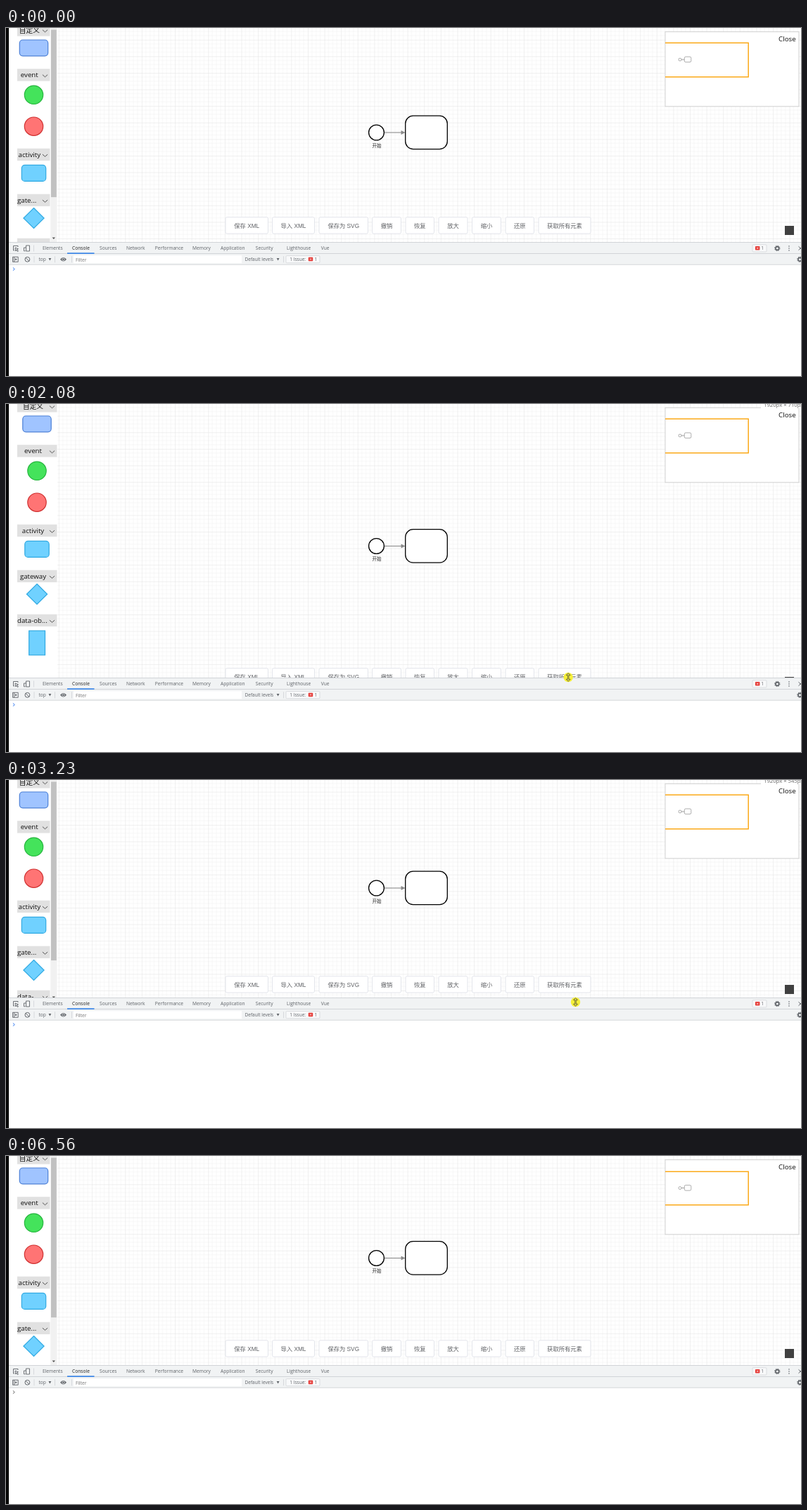
Write an HTML page that moves like this. It is 1130 px wide and 496 px high and loops after 6880 ms.

```html
<!DOCTYPE html>
<html lang="en">
<head>
<meta charset="utf-8">
<title>Resizing the panel</title>
<style>
  html, body { margin: 0; width: 100%; height: 100%; overflow: hidden; background: #fff; }
  svg { display: block; width: 1130px; height: 496px; }
  text { font-family: "Open Sans", "Noto Sans CJK SC", "Noto Sans CJK", sans-serif; white-space: pre; }
  .cjk { font-family: "Liberation Sans", "Noto Sans CJK SC", "Noto Sans CJK", sans-serif; }
</style>
</head>
<body>
<svg id="stage" viewBox="0 0 1130 496" xmlns="http://www.w3.org/2000/svg">
  <defs>
    <pattern id="grid" x="4" y="-6.9" width="23.61" height="23.61" patternUnits="userSpaceOnUse">
      <path d="M0 5.9H23.61M0 11.8H23.61M0 17.7H23.61M5.9 0V23.61M11.8 0V23.61M17.7 0V23.61"
        fill="none" stroke="#e0e0e0" stroke-width=".6" opacity=".45"/>
      <path d="M0 .3H23.61M.3 0V23.61" fill="none" stroke="#e0e0e0" stroke-width=".6"/>
    </pattern>
    <clipPath id="pageClip"><rect id="pageRect" width="1130" height="305"/></clipPath>
  </defs>
</svg>
<script>
const LOOP = 6880;
const stage = document.getElementById('stage');

function add(parent, tag, attrs = {}, content) {
  const el = document.createElementNS('http://www.w3.org/2000/svg', tag);
  for (const k in attrs) el.setAttribute(k, attrs[k]);
  if (content !== undefined) el.textContent = content;
  parent.append(el);
  return el;
}
const group = (parent, attrs) => add(parent, 'g', attrs);
const rect = (p, x, y, width, height, fill, more) => add(p, 'rect', { x, y, width, height, fill, ...more });
const path = (p, d, stroke, w = 1, fill = 'none') => add(p, 'path', { d, stroke, 'stroke-width': w, fill });
const circle = (p, cx, cy, r, fill, stroke = 'none', w = 1) =>
  add(p, 'circle', { cx, cy, r, fill, stroke, 'stroke-width': w });
// y is the middle of the line
const label = (p, x, y, str, size, fill, more) =>
  add(p, 'text', { x, y: y + size * .36, 'font-size': size, fill, ...more }, str);
const mid = { 'text-anchor': 'middle' };
const move = (el, x, y) => el.setAttribute('transform', `translate(${x} ${y})`);
const show = (el, on) => el.setAttribute('display', on ? 'inline' : 'none');

// ---- page ----
const page = group(stage, { 'clip-path': 'url(#pageClip)' });
rect(page, 73, 0, 1057, 496, 'url(#grid)');

const diagram = group(page);
path(diagram, 'M538 0H563', '#8a8a8a', 1.1);
path(diagram, 'M561.5 -3L567.5 0L561.5 3Z', 'none', 0, '#8a8a8a');
circle(diagram, 526.5, 0, 10.9, '#fff', '#000', 1.3);
rect(diagram, 567.7, -23.8, 59.6, 47.4, '#fff', { rx: 11, stroke: '#000', 'stroke-width': 1.3 });
label(diagram, 527, 18.3, '开始', 6.6, '#222', { ...mid, class: 'cjk' });

const buttons = group(page);
[[312, 372.5, '保存 XML'], [378.5, 438.5, '导入 XML'], [445, 514.5, '保存为 SVG'],
 [520.5, 561.5, '撤销'], [568, 608.5, '恢复'], [615, 656, '放大'], [662.5, 703.5, '缩小'],
 [710, 750.5, '还原'], [757, 831, '获取所有元素']].forEach(([a, b, str]) => {
  rect(buttons, a, -11.8, b - a, 23.4, '#fff', { rx: 2, stroke: '#dcdfe6', 'stroke-width': .8 });
  label(buttons, (a + b) / 2, 0, str, 8.3, '#606266', { ...mid, class: 'cjk' });
});
const mark = rect(page, 1107, 0, 13, 13, '#404040');

// ---- palette, in a narrow and a wide layout ----
function palette(wide) {
  const g = group(page);
  const c = wide ? 44 : 39.5, right = wide ? 72.5 : 62.5;
  rect(g, 4, 0, 69, 496, '#fff');
  const shape = { stroke: '#2fa9e2', 'stroke-width': 1.2 };
  [[3, '自定义'], [67, 'event'], [180.5, 'activity'],
   [245.5, wide ? 'gateway' : 'gate...'], [308.5, wide ? 'data-ob...' : 'data-...']].forEach(([y, str], i) => {
    rect(g, 16, y - 8.8, right - 16, 17.4, '#e1e1e1');
    const tight = i > 3 || (i == 3 && !wide);
    label(g, tight ? 16 : c - (wide ? 5.5 : 6.2), y, str, 9.7, '#111', tight ? {} : mid);
    const x = right - 7;
    path(g, `M${x - 3.6} ${y - .4}L${x} ${y + 2.8}L${x + 3.6} ${y - .4}`, '#444', .9);
  });
  rect(g, c - 20.2, 17, 40.4, 22.8, '#a0c4ff', { rx: 4.5, stroke: '#4a7fd6', 'stroke-width': 1.2 });
  circle(g, c, 95.3, 13.2, '#44e35b', '#27b53f', 1.2);
  circle(g, c, 140.2, 13.2, '#ff7474', '#cf3030', 1.2);
  rect(g, c - 17.2, 195.4, 34.4, 23, '#70d1ff', { rx: 4.5, ...shape });
  path(g, `M${c} 256.5L${c + 14.6} 271L${c} 285.5L${c - 14.6} 271Z`, shape.stroke, 1.2, '#70d1ff');
  rect(g, c - 11.3, 323.2, 22.8, 34.6, '#70d1ff', shape);
  return g;
}
const wide = palette(true), narrow = palette(false);
rect(narrow, 63.3, 0, 9.2, 496, '#f1f1f1');
const thumb = rect(narrow, 64, 2.5, 7.8, 238, '#c1c1c1');
const scrollArrow = path(narrow, 'M-2.2 -1.2H2.2L0 1.4Z', 'none', 0, '#505050');

// ---- minimap ----
rect(page, 937, 5.3, 190, 106.5, '#fff', { stroke: '#ccc', 'stroke-width': .9 });
const view = path(page, '', '#fba919', 1.5);
const tiny = group(page);
circle(tiny, 958, 0, 2, '#fff', '#777', .6);
path(tiny, 'M960 0H964', '#777', .7);
rect(tiny, 964.3, -4, 9.5, 7.6, '#fff', { rx: 1.8, stroke: '#777', 'stroke-width': .6 });
label(page, 1098, 15.2, 'Close', 9.8, '#111');
const sizeTip = group(page);
rect(sizeTip, 1073, 0, 57, 6, '#fff');
const sizeText = label(sizeTip, 1077, .8, '', 7.7, '#666');

// ---- developer tools ----
const tools = group(stage);
const ink = '#5f6368';
rect(tools, 4, -9, 1126, 520, '#fff');
rect(tools, 4, -9, 1126, 32, '#f1f3f4');
for (const y of [-9, 7.2, 22.8]) rect(tools, 4, y, 1126, .8, '#cacdd1');
path(tools, 'M12 3H10.5V-3.5H17V-2M13 -1L17.5 .8L15.4 1.6L17.5 4L16.5 4.6L14.8 2.4L13.6 4Z', ink, .9);
path(tools, 'M27.5 3.8H25.5V-1H28.5M28.5 -4H33.5V4H28.5Z', ink, .9);
path(tools, 'M39.5 -4.5V4.5', '#cacdd1', .7);
[[52, 'Elements'], [94, 'Console'], [133, 'Sources'], [171, 'Network'], [211.8, 'Performance'],
 [265, 'Memory'], [305, 'Application'], [354.8, 'Security'], [399, 'Lighthouse'], [447.8, 'Vue']]
  .forEach(([x, str]) => label(tools, x, 0, str, 6.65, str == 'Console' ? '#222' : ink));
rect(tools, 87, 6.4, 38.5, 1.4, '#1a73e8');

function gear(x, y) {
  circle(tools, x, y, 2.4, 'none', ink, 1.6);
  add(tools, 'circle', { cx: x, cy: y, r: 3.7, fill: 'none', stroke: ink, 'stroke-width': 1, 'stroke-dasharray': '1.5 1.4' });
}
function badge(x, y) {
  rect(tools, x, y - 3, 6.4, 5.4, '#e53935', { rx: .7 });
  path(tools, `M${x + 2} ${y - 1.5}L${x + 4.4} ${y + .9}M${x + 4.4} ${y - 1.5}L${x + 2} ${y + .9}`, '#fff', .7);
}
const chip = (x, y, w) => rect(tools, x, y - 5.2, w, 10.2, '#f8f9fa', { rx: 1.2, stroke: '#cfd2d6', 'stroke-width': .7 });
chip(1061, 0, 20);
badge(1065, 0);
label(tools, 1073.3, 0, '1', 6.6, ink);
gear(1096.3, 0);
for (const y of [-3, 0, 3]) circle(tools, 1113, y, .8, ink);
path(tools, 'M1126.5 -2.7L1132 2.7M1126.5 2.7L1132 -2.7', ink, 1);

const row = 15.8;
path(tools, `M9.5 ${row - 3.5}H17.2V${row + 3.5}H9.5ZM11.5 ${row - 3.5}V${row + 3.5}`, ink, .9);
path(tools, `M13 ${row - 1.8}L15.8 ${row}L13 ${row + 1.8}Z`, 'none', 0, ink);
circle(tools, 30.4, row, 3.4, 'none', ink, 1);
path(tools, `M28 ${row - 2.4}L32.8 ${row + 2.4}`, ink, 1);
label(tools, 46.4, row, 'top', 6.6, ink);
for (const x of [62.4, 386.6]) path(tools, `M${x - 1.9} ${row - 1.7}H${x + 1.9}L${x} ${row + 1.7}Z`, 'none', 0, ink);
for (const x of [40, 69.5, 93.5, 394.5]) path(tools, `M${x} ${row - 4.5}V${row + 4.5}`, '#cacdd1', .7);
path(tools, `M77 ${row}Q81.5 ${row - 5.6} 86 ${row}Q81.5 ${row + 5.6} 77 ${row}Z`, 'none', 0, ink);
circle(tools, 81.5, row, 1.7, ink, '#f1f3f4', .8);
rect(tools, 96, row - 5.6, 239, 11, '#fff');
label(tools, 99, row + .4, 'Filter', 6.6, '#777');
label(tools, 339.5, row, 'Default levels', 6.5, ink);
chip(398, row, 48);
label(tools, 403.3, row, '1 Issue:', 6.5, ink);
badge(429.8, row);
label(tools, 438.6, row, '1', 6.6, ink);
gear(1128.4, row);
const prompt = path(tools, 'M9.9 27.5L12.3 29.6L9.9 31.7', '#367cf1', 1);

rect(stage, 0, 0, 4, 496, '#000');

// ---- pointers ----
const arrow = path(stage, 'M0 0V10L2.3 7.9L4 11.6L5.6 10.9L4 7.3H7Z', '#222', .8, '#fff');
const resizer = group(stage);
const ring = circle(resizer, 0, 0, 6.7, '#f6f03a');
path(resizer, 'M0 -6L3 -2.8H.8V2.8H3L0 6L-3 2.8H-.8V-2.8H-3Z', '#4a4a20', .7, '#d9d35a');

// ---- motion ----
// start, end, number of steps; the picture rests in between
const bursts = [[280, 830, 8], [1130, 1760, 9], [1840, 2450, 9], [2530, 2850, 5], [3080, 3390, 5],
  [3690, 3770, 2], [4380, 4610, 4], [5010, 5100, 2], [5710, 6320, 9], [6400, 6560, 3]];

function stepTime(t) {
  let last = 0;
  for (const [a, b, n] of bursts) {
    if (t < a) break;
    const gap = (b - a) / (n - 1);
    last = a + gap * Math.min(n - 1, Math.floor((t - a) / gap + .06));
  }
  return last;
}

function track(keys, t, col = 1) {
  let i = keys.findIndex(k => k[0] > t);
  if (i == 0) return keys[0][col];
  if (i < 0) return keys[keys.length - 1][col];
  const a = keys[i - 1], b = keys[i];
  return a[col] + (b[col] - a[col]) * (t - a[0]) / (b[0] - a[0]);
}

const barKeys = [[1150, 314], [1400, 400], [1720, 449], [1760, 456], [1860, 472], [1940, 470],
  [2250, 300], [2400, 266], [2475, 266], [2700, 385], [2800, 419], [3040, 419], [3190, 324],
  [3230, 320], [3340, 300], [3645, 300], [3725, 416], [4340, 416], [4450, 453], [4560, 325],
  [4640, 325], [4900, 307]];
const dragX = [[830, 839.5], [1130, 839.5], [1760, 798.5], [2450, 800], [3230, 809.5], [4610, 812]];
const freePath = [[280, 933, 441], [500, 893, 378], [830, 839, 315], [5010, 812.5, 307.5],
  [5700, 813, 310], [6000, 950, 385], [6320, 1094, 458], [6560, 1115, 496]];

const px = v => Math.round(v * 2) / 2;

function draw(time) {
  const t = stepTime(time);
  const bar = Math.round(track(barKeys, t));
  const pageBar = Math.round(track(barKeys, t - 40)); // the page follows a little late

  document.getElementById('pageRect').setAttribute('height', pageBar - 9);
  move(diagram, 0, px(149 + (pageBar - 314) / 2));
  move(buttons, 0, pageBar - 32.5);
  mark.setAttribute('y', pageBar - 32);

  const u = pageBar - 266, fits = pageBar > 382;
  show(wide, fits);
  show(narrow, !fits);
  thumb.setAttribute('height', Math.max(0, 168.5 + 1.34 * u + .0025 * u * u));
  move(scrollArrow, 67.8, pageBar - 14.3);

  const late = t >= 3770 && time >= 4000;
  view.setAttribute('d', `M937 ${late ? 22.3 : 21.3}H1055.2V69.7H937`);
  move(tiny, 0, late ? 45.6 : 45);

  show(sizeTip, t > 1140 && t < 5010);
  sizeText.textContent = `1920px × ${Math.round(447 + 1.694 * u)}px`;

  move(tools, 0, bar);
  prompt.setAttribute('stroke', t >= 5010 ? '#666' : '#367cf1');

  const dragging = t >= 829 && t < 5010;
  show(resizer, dragging);
  show(ring, t >= 1130);
  move(resizer, track(dragX, t), track(barKeys, t + 20) + 1);
  show(arrow, !dragging && t >= 280 && t < 6559);
  move(arrow, track(freePath, t), track(freePath, t, 2));
}

const begin = performance.now();
function tick() {
  draw((performance.now() - begin) % LOOP);
  requestAnimationFrame(tick);
}
tick();
</script>
</body>
</html>
```
